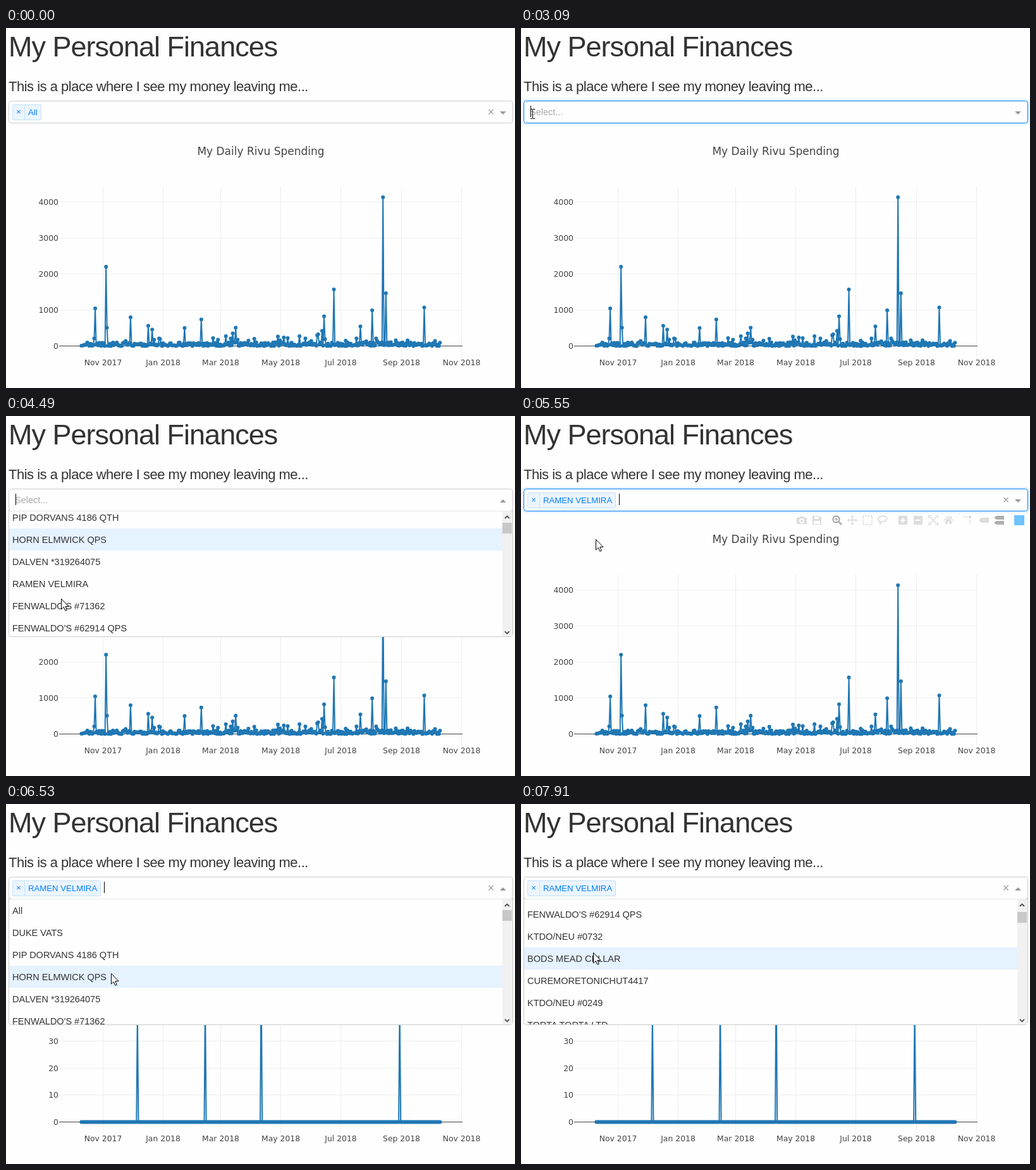
An HTML page that plays this animation: 805 px wide and 570 px high, repeating every 8000 ms.

```html
<!DOCTYPE html>
<html lang="en">
<head>
<meta charset="utf-8">
<title>My Personal Finances</title>
<style>
html, body { margin: 0; width: 100%; height: 100%; overflow: hidden; background: #fefefe; }
svg { display: block; width: 100vw; height: 100vh; }
.ui { font-family: "Liberation Sans", Arial, sans-serif; font-size: 14.5px; fill: #333; }
.plot { font-family: "DejaVu Sans", Verdana, sans-serif; font-size: 12.4px; fill: #444; }
</style>
</head>
<body>
<svg id="stage" viewBox="0 0 805 570" xmlns="http://www.w3.org/2000/svg"></svg>
<script>
const stage = document.getElementById('stage');
const LOOP = 8000, ZERO = 503.5, BLUE = '#1f77b4', ROW = 35, LIST_TOP = 151;
const DAY_ONE = 119.33, DAY = 567 / 365;
const PICK = 'RAMEN VELMIRA';
const SHOPS = ['All', 'DUKE VATS', 'PIP DORVANS 4186 QTH', 'HORN ELMWICK QPS',
  'DALVEN *319264075', PICK, "FENWALDO'S #71362", "FENWALDO'S #62914 QPS",
  'KTDO/NEU #0732', 'BODS MEAD CELLAR', 'CUREMORETONICHUT4417', 'KTDO/NEU #0249',
  'TORTA TORTA LTD', 'OLMA DINER 2207'];

// x position and height of the days that stand out
const PEAKS = [139.5, 12, 141, 59.5, 158.5, 125.5, 160, 29, 190, 8, 197.5, 45.5, 225, 32,
  231.5, 26, 235, 10, 242, 12, 243.5, 11, 282.5, 28.5, 309, 42, 328, 12.5, 335, 10,
  348, 15.5, 356, 12, 359, 20, 363.5, 29, 367, 10, 383, 8.5, 393, 11.5, 430, 15,
  433, 9, 439, 13.5, 446, 12.5, 464, 15.5, 473.5, 12, 483, 8, 492, 17, 494, 18.5,
  500, 24, 503, 47, 505, 11, 518.5, 89.5, 537, 8.5, 554, 12, 560.5, 31, 570, 7.5, 579, 56.5,
  585.5, 12, 587, 8, 596.3, 235.5, 601, 83.5, 616, 9, 635, 9, 661.5, 61, 678, 8];
const VISITS = [208, 171, 315, 192, 404, 235.5, 622.5, 184];

function heights(base, peaks) {
  const days = Array.from({ length: 366 }, base);
  for (let i = 0; i < peaks.length; i += 2) days[Math.round((peaks[i] - DAY_ONE) / DAY)] = peaks[i + 1];
  return days;
}

let seed = 20171;
const rnd = () => (seed = seed * 16807 % 2147483647) / 2147483647;
const allDays = heights(() => rnd() ** 1.5 * 6, PEAKS);
const pickDays = heights(() => 0, VISITS);

const text = (x, y, s, attrs = '') => `<text x="${x}" y="${y}" ${attrs}>${s}</text>`;
const rect = (x, y, w, h, attrs) => `<rect x="${x}" y="${y}" width="${w}" height="${h}" ${attrs}/>`;
const path = (d, attrs) => `<path d="${d}" ${attrs}/>`;
const line = (d, color, width = 1) => path(d, `fill="none" stroke="${color}" stroke-width="${width}"`);
const at = (x, y, s) => `<g transform="translate(${x} ${y})">${s}</g>`;

function trace(days) {
  const pts = days.map((h, i) => `${(DAY_ONE + i * DAY).toFixed(2)} ${(ZERO - h).toFixed(1)}`);
  return path('M' + pts.join('L'), `fill="none" stroke="${BLUE}" stroke-width="2" stroke-linejoin="round"`) +
    path(pts.map(p => `M${p}h0`).join(''), `fill="none" stroke="${BLUE}" stroke-width="6" stroke-linecap="round"`);
}
const traces = { all: trace(allDays), pick: trace(pickDays) };

function chart(kind) {
  const months = ['Nov 2017', 'Jan 2018', 'Mar 2018', 'May 2018', 'Jul 2018', 'Sep 2018', 'Nov 2018'];
  const monthX = [153.5, 248.5, 339.5, 434.5, 529.5, 625.5, 720.5];
  const [count, gap, unit] = kind === 'all' ? [4, 57, 1000] : [5, 42.65, 10];
  let s = '';
  monthX.forEach((x, i) => {
    s += line(`M${x} 251V521`, '#eee') + text(x, 534, months[i], 'text-anchor="middle"');
  });
  for (let i = 0; i <= count; i++) {
    const y = Math.floor(ZERO - i * gap) + .5;
    s += line(`M84 ${y}H${i ? 721 : 722}`, i ? '#eee' : '#444') +
      text(83, y + 4.5, i * unit, 'text-anchor="end"');
  }
  return `<g class="plot">${s}${text(403, 201, 'My Daily Rivu Spending', 'text-anchor="middle" font-size="17"')}${traces[kind]}</g>`;
}

const LIGHT = '#c7c7c7', DARK = '#7c7c7c';
const fill = (d, c = LIGHT) => path(d, `fill="${c}" fill-rule="evenodd"`);
const tag = (y, h, c) => fill(`M-8 ${y + h / 2}L-4 ${y}H8V${y + h}H-4Z`, c);
const ICONS = [
  [444, fill('M-8-4H-4L-3-6H3L4-4H8V6H-8ZM0-3A4 4 0 1 0 0 5A4 4 0 1 0 0-3ZM0-1A2 2 0 1 1 0 3A2 2 0 1 1 0-1Z')],
  [468, fill('M-7-7H4L7-4V7H-7ZM-4-6V-2H3V-6ZM-5 1V6H5V1Z')],
  [500, `<circle cx="-1.5" cy="-1.5" r="5" fill="none" stroke="${DARK}" stroke-width="2.4"/>` +
    line('M2 2L7 7', DARK, 3) + line('M-4-1.5H1M-1.5-4V1', DARK, 1.4)],
  [524, line('M-6 0H6M0-6V6', LIGHT, 1.6) + fill('M-8 0L-5-3V3ZM8 0L5-3V3ZM0-8L-3-5H3ZM0 8L-3 5H3Z')],
  [548, path('M-7-7H7V7H-7Z', `fill="none" stroke="${LIGHT}" stroke-width="2" stroke-dasharray="2 2"`)],
  [572, `<ellipse cx="0" cy="-2" rx="7" ry="4.5" fill="none" stroke="${LIGHT}" stroke-width="1.8" transform="rotate(-10)"/>` +
    line('M-5 1Q-6 4-3 4Q-3 6-5 7', LIGHT, 1.6)],
  [604, fill('M-7-7H7V7H-7ZM-1-4V-1H-4V1H-1V4H1V1H4V-1H1V-4Z')],
  [628, fill('M-7-7H7V7H-7ZM-4-1V1H4V-1Z')],
  [652, line('M-7-3V-7H-3M3-7H7V-3M7 3V7H3M-3 7H-7V3M-5-5L5 5M5-5L-5 5', LIGHT, 1.6)],
  [676, fill('M-8 0L0-7L3-4V-6H5V-2.5L8 0L7 1L0-5L-7 1ZM-5 1L0-3.5L5 1V6H1.5V2H-1.5V6H-5Z')],
  [707, fill('M-7-6H-5V-4H-7ZM-3-6H-1V-4H-3ZM1-7H5V-3H1ZM2-1H4V1H2ZM2 3H4V5H2Z')],
  [732, tag(-4, 8, LIGHT)],
  [756, tag(-7, 6, DARK) + tag(1, 6, DARK)],
];
const modebar = ICONS.map(([x, s]) => at(x, 165, s)).join('') + rect(780, 157, 16, 16, 'fill="#119dff"');

const hoverLabel = () => `<g class="plot">
  ${path('M192.5 522L198 527.5H241V549.5H144V527.5H187Z', 'fill="#444"')}
  ${text(192.5, 543.5, 'Nov 26, 2017', 'text-anchor="middle" style="font-size:13px;fill:#fff"')}
  ${path('M194 501L201 495.5V490.5H240V511.5H201V506.5Z', `fill="${BLUE}"`)}
  ${text(205, 505.5, '8.24', 'style="font-size:13px;fill:#fff"')}</g>`;

const POINTERS = {
  arrow: path('M.5.5V17L4.3 13.5L6.8 19.3L9.3 18.2L6.8 12.5H12Z', 'fill="#fff" stroke="#000"'),
  cross: line('M-13 .5H13M.5-13V13', '#222'),
  beam: line('M-3-7.5H0M1-7.5H4M-3 7.5H0M1 7.5H4M.5-7V7', '#000'),
  hand: path('M-1.5 1.5Q0-1 1.5 1.5V7L8 8.5Q10.5 9 10.5 12L9 20H0L-5 12Q-5 9-1.5 11Z', 'fill="#fff" stroke="#000"'),
};

function chip(label) {
  const w = label === 'All' ? 46 : 140;
  return rect(10.5, 121.5, w - 1, 24, 'rx="2" fill="#ebf5ff" stroke="#c2e0ff"') +
    line('M29.5 122V145', '#c2e0ff') +
    text(20, 137, '×', 'text-anchor="middle" style="font-size:13px;fill:#007eff"') +
    text(35, 138, label, 'style="font-size:13.2px;fill:#007eff"');
}

function select(s) {
  const glow = s.focus && !s.open;
  let out = glow ? rect(2.5, 113.5, 801, 39, 'rx="6" fill="none" stroke="#e5f2ff" stroke-width="3"') : '';
  out += rect(4.5, 115.5, 797, 35, `rx="4" fill="#fefefe" stroke="${glow ? '#007eff' : '#ccc'}"`);
  out += s.chip ? chip(s.chip) + text(767, 139, '×', 'text-anchor="middle" style="font-size:18px;fill:#999"')
    : text(14, 138, 'Select...', 'style="fill:#aaa"');
  out += path(s.open ? 'M781 137H791L786 132Z' : 'M781 132H791L786 137Z', 'fill="#999"');
  if (s.caret) out += line(`M${s.chip ? 155.5 : 15.5} 123V141`, '#000');
  return out;
}

function menu(s) {
  const list = SHOPS.filter(n => n !== s.chip);
  let rows = '';
  list.forEach((name, i) => {
    const y = LIST_TOP + i * ROW - s.scroll;
    if (y < 100 || y > 350) return;
    if (i === s.hot) rows += rect(5, y, 780, ROW, 'fill="#e5f2ff"');
    rows += text(10, y + 23, name);
  });
  return path('M4.5 147V345.5Q4.5 349.5 8.5 349.5H797.5Q801.5 349.5 801.5 345.5V147', 'fill="#fefefe" stroke="#ccc"') +
    `<g clip-path="url(#list)">${rows}</g>` +
    rect(785, 151, 16, 198, 'fill="#f1f1f1"') +
    rect(785, 168 + Math.round(s.scroll / 68), 15, 17, 'fill="#c8c8c8"') +
    line('M789 162L792.5 158.5L796 162M789 341L792.5 344.5L796 341', '#505050', 1.8);
}

function draw(s) {
  stage.innerHTML = `<clipPath id="list">${rect(5, LIST_TOP, 780, 198, '')}</clipPath>
    ${rect(0, 0, 805, 570, 'fill="#fefefe"')}
    <g class="ui">
      ${text(4, 45, 'My Personal Finances', 'style="font-size:45px;letter-spacing:-1px"')}
      ${text(4, 100, 'This is a place where I see my money leaving me...', 'style="font-size:22px;letter-spacing:-.5px"')}
    </g>
    ${chart(s.data)}
    <g opacity="${s.bar}">${modebar}</g>
    ${s.label ? hoverLabel() : ''}
    <g class="ui">${s.open ? menu(s) : ''}${select(s)}${s.open ? line('M5 150.5H801', '#e6e6e6') : ''}</g>
    ${s.kind ? at(s.x, s.y, POINTERS[s.kind]) : ''}`;
}

// each cue changes part of the state and holds until the next
const CUES = [
  [0, { data: 'all', bar: 0, label: false, chip: 'All', focus: false, open: false, caret: false, scroll: 0, hot: 0, kind: '', x: 0, y: 0 }],
  [250, { kind: 'cross', x: 192, y: 470, bar: .3 }],
  [380, { y: 420, bar: .7, label: true }],
  [510, { y: 385, bar: 1 }],
  [820, { x: 178, y: 325 }],
  [960, { x: 163, y: 278, label: false }],
  [1100, { x: 152, y: 253 }],
  [1840, { kind: 'arrow', x: 164, y: 220 }],
  [1970, { x: 130, y: 190 }],
  [2110, { x: 82, y: 162 }],
  [2240, { x: 44, y: 143, bar: .75 }],
  [2380, { x: 25, y: 133, bar: .4 }],
  [2510, { kind: 'hand', x: 18, y: 129, bar: .1 }],
  [2650, { bar: 0 }],
  [3090, { kind: 'beam', x: 18, y: 136, chip: '', focus: true, caret: true }],
  [3370, { x: 52, y: 141, open: true }],
  [3510, { x: 87, y: 146 }],
  [3790, { caret: false }],
  [3930, { kind: 'arrow', y: 215, hot: 1 }],
  [4060, { y: 289, hot: 3 }],
  [4350, { scroll: 45, caret: true }],
  [4490, { scroll: 78 }],
  [4630, { y: 284, hot: 6 }],
  [4760, { y: 272, hot: 5 }],
  [4880, { y: 266, caret: false }],
  [5160, { chip: PICK, open: false, caret: true, scroll: 0, hot: 0 }],
  [5280, { x: 90, y: 255, bar: .1 }],
  [5420, { x: 100, y: 228, bar: .3 }],
  [5550, { x: 118, y: 195, bar: .6 }],
  [5680, { x: 142, y: 165, bar: .8 }],
  [5830, { kind: 'beam', x: 165, y: 138, bar: .4, data: 'pick' }],
  [5970, { x: 168, y: 135, bar: 0 }],
  [6110, { open: true }],
  [6250, { kind: 'arrow', y: 165 }],
  [6390, { y: 215, hot: 1 }],
  [6530, { x: 166, y: 268, hot: 3 }],
  [6670, { x: 158, y: 262, caret: false }],
  [6800, { x: 138, y: 248, hot: 2 }],
  [6940, { x: 120, y: 238 }],
  [7070, { x: 114, y: 235, scroll: 45 }],
  [7210, { scroll: 78, hot: 4, caret: true }],
  [7490, { scroll: 130 }],
  [7630, { scroll: 180 }],
  [7770, { scroll: 204, caret: false }],
  [7910, { hot: 8 }],
];
const states = [];
for (const [, change] of CUES) states.push({ ...states[states.length - 1], ...change });

let shown = -1;
const start = performance.now();
function tick() {
  const t = (performance.now() - start) % LOOP;
  let i = CUES.length - 1;
  while (CUES[i][0] > t) i--;
  if (i !== shown) draw(states[shown = i]);
  requestAnimationFrame(tick);
}
tick();
</script>
</body>
</html>
```
